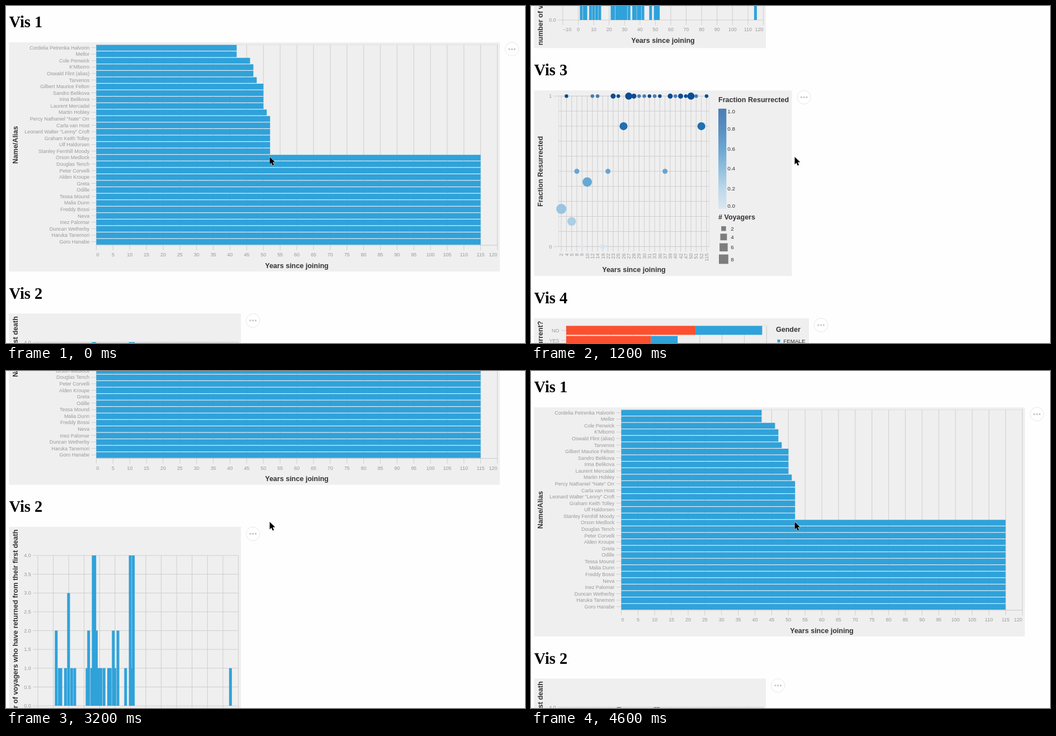
Animation of 928 by 603 pixels, one loop 4800 ms. Source, as an HTML page:

```html
<!DOCTYPE html>
<html lang="en">
<head>
<meta charset="utf-8">
<title>Four charts</title>
<style>
html, body { margin: 0; width: 100%; height: 100%; overflow: hidden; background: #fefefe; }
svg { display: block; width: 928px; height: 603px; }
text { font-family: "Liberation Sans", Arial, sans-serif; }
.heading { font: bold 28.4px "Liberation Serif", Times, serif; }
</style>
</head>
<body>
<svg viewBox="0 0 928 603">
  <defs>
    <linearGradient id="ramp" x1="0" y1="0" x2="0" y2="1">
      <stop offset="0" stop-color="#4d7db3"/>
      <stop offset=".2" stop-color="#588fc2"/>
      <stop offset=".4" stop-color="#6ba6d0"/>
      <stop offset=".6" stop-color="#91bfde"/>
      <stop offset=".8" stop-color="#bdd7ea"/>
      <stop offset="1" stop-color="#dae6f3"/>
    </linearGradient>
  </defs>
  <g id="page"></g>
  <path d="M471.5 270v13.4l3.1-2.9 2.1 5 2.4-1-2.1-4.9h4.3z" fill="#000" stroke="#fff" stroke-width="1" paint-order="stroke"/>
</svg>
<script>
const BLUE = '#30a2da', RED = '#fc4f30', GRID = '#cbcbcb', FAINT = '#dcdcdc';
const LABEL = 8.96, TITLE = 12.54, LEGEND = 9.86;

const range = (n, f) => Array.from({ length: n }, (_, i) => f(i)).join('');
const rect = (x, y, w, h, fill) => `<rect x="${x}" y="${y}" width="${w}" height="${h}" fill="${fill}"/>`;
const line = (x1, y1, x2, y2, color = GRID) =>
  `<path d="M${x1} ${y1}L${x2} ${y2}" stroke="${color}" stroke-width=".9"/>`;
const frame = (x, y, w, h) =>
  `<rect x="${x}" y="${y}" width="${w}" height="${h}" fill="none" stroke="${FAINT}" stroke-width=".9"/>`;

// Text centred vertically on y
function text(s, x, y, { size = LABEL, anchor = 'middle', fill = '#999', bold = false, turn = false } = {}) {
  const spin = turn ? ` transform="rotate(-90 ${x} ${y})"` : '';
  return `<text x="${x}" y="${y + size * .355}" font-size="${size}" text-anchor="${anchor}" fill="${fill}"` +
    `${bold ? ' font-weight="bold"' : ''}${spin}>${s}</text>`;
}
const title = (s, x, y, opts) => text(s, x, y, { size: TITLE, bold: true, fill: '#333', ...opts });
const legend = (s, x, y) => text(s, x, y, { size: LEGEND, anchor: 'start', fill: '#333' });
const yLabel = (s, x, y) => text(s, x, y, { anchor: 'end' });
const heading = (n, y) => `<text class="heading" x="5.5" y="${y}">Vis ${n}</text>`;
const group = (y, body) => `<g transform="translate(0 ${y})">${body}</g>`;

function menu(x, y) {
  return `<circle cx="${x}" cy="${y}" r="12.2" fill="#fff" stroke="#e4e4e4" stroke-width=".9"/>` +
    range(3, i => `<circle cx="${x - 4.8 + i * 4.8}" cy="${y}" r="1.7" fill="#cacaca"/>`);
}

// Vertical grid with ticks; the end labels stay inside the plot
function xAxis(x, step, count, top, bottom, first, unit) {
  return range(count + 1, i => {
    const px = x + i * step, v = first + i * unit;
    const anchor = i === 0 ? 'start' : i === count ? 'end' : 'middle';
    return line(px, top, px, bottom + 9) + text(v < 0 ? '\u2212' + -v : v, px, bottom + 17, { anchor });
  });
}

const names = [
  'Cordelia Petrenka Halvorin', 'Mellor', 'Cole Penwick', "K'Mborro", 'Oswald Flint (alias)',
  'Tarvenos', 'Gilbert Maurice Felton', 'Sandro Belikova', 'Irina Belikova', 'Laurent Mercadal',
  'Martin Hobley', 'Percy Nathaniel "Nate" Orr', 'Carla van Host', 'Leonard Walter "Lenny" Croft',
  'Graham Keith Tolley', 'Ulf Haldorsen', 'Stanley Fernhill Moody', 'Orson Medlock', 'Douglas Tench',
  'Peter Corvelli', 'Alden Kroupe', 'Greta', 'Odille', 'Tessa Mound', 'Malia Dunn', 'Freddy Bossi',
  'Neva', 'Inez Palomar', 'Duncan Wetherby', 'Haruka Tanemori', 'Goro Hanabe'
];
const service = [42, 42, 46, 47, 47, 48, 50, 50, 50, 50, 51, 52, 52, 52, 52, 52, 52];

function chart1() {
  const x = 161.5, y = 69.2, step = 11.57, bottom = 428, perYear = 5.975;
  return heading(1, 38) + rect(5.5, 65, 877.5, 410, '#efefef') + menu(904.7, 77.2) +
    frame(x, y, 717, bottom - y) +
    xAxis(x, perYear * 5, 24, y, bottom, 0, 5) +
    names.map((name, i) => {
      const cy = 74.5 + i * step;
      return line(152.5, cy, x, cy) + yLabel(name, 149.2, cy) +
        rect(x, cy - 4.9, (service[i] || 115) * perYear, 10.4, BLUE);
    }).join('') +
    line(x, bottom, x + 717, bottom) +
    title('Years since joining', 520, 464.5) +
    title('Name/Alias', 16.5, 248.5, { turn: true });
}

// Year: number of people who returned
const returned = {
  2: 2, 4: 1, 5: 1, 8: 1, 10: 3, 12: 1, 14: 1, 22: 1, 23: 2, 25: 1, 26: 4, 27: 4, 28: 2, 29: 1, 30: 1,
  31: 1, 33: 1, 36: 1, 37: 1, 39: 2, 40: 1, 42: 2, 47: 1, 50: 4, 51: 1, 52: 4, 115: 1
};

function chart2() {
  const x = 57, top = 128.5, bottom = 397.5, perYear = 2.757, unit = 67.25;
  return heading(2, 50.5) + rect(5.5, 77.3, 414.5, 370.5, '#efefef') + menu(441.6, 89.8) +
    xAxis(x, perYear * 10, 13, top, bottom, -10, 10) +
    range(9, i => {
      const y = bottom - i * unit / 2;
      return line(48, y, 415.4, y) + yLabel((i / 2).toFixed(1), 44.8, y);
    }) +
    Object.entries(returned).map(([year, n]) =>
      rect(81.8 + year * perYear, bottom - n * unit, 5, n * unit, BLUE)).join('') +
    title('Years since joining', 236, 434) +
    title('number of voyagers who have returned from their first death', 16.5, 262.5, { turn: true });
}

const years = [2, 4, 5, 8, 9, 10, 12, 14, 19, 22, 23, 25, 26, 27, 28, 29, 30, 31, 33, 36, 37, 39, 40, 42, 47, 50, 51, 52, 115];
const people = { 2: 8, 5: 6, 8: 2, 10: 7, 19: 2, 22: 2, 23: 2, 26: 5, 27: 4, 28: 2, 37: 2, 39: 2, 42: 2, 50: 4, 52: 5 };
const partial = {
  2: [.25, '#99c4e2'], 5: [1 / 6, '#abcfe6'], 8: [.5, '#68a3d1'], 9: [0, '#dae7f4'], 10: [3 / 7, '#66a8d4'],
  19: [0, '#d5e4f3'], 22: [.5, '#68a3d1'], 26: [.8, '#216eb3'], 37: [.5, '#68a3d1'], 52: [.8, '#216eb3']
};
const pale = [12, 14, 29, 30, 33, 40, 51];

function chart3() {
  const x = 49.5, top = 161.2, bottom = 430.4, h = bottom - top, step = 269 / 29;
  const cx = i => x + (i + .5) * step;
  return heading(3, 124.3) + rect(5.5, 151, 461, 332, '#efefef') + menu(488.2, 163.3) +
    frame(x, top, 269, h) +
    range(11, i => line(i % 10 ? x : 40.5, top + h * i / 10, 318.5, top + h * i / 10)) +
    yLabel('1', 37.2, top) + yLabel('0', 37.2, bottom) +
    years.map((year, i) => line(cx(i), top, cx(i), bottom + 9) +
      text(year, cx(i), 442.5, { anchor: 'end', turn: true })).join('') +
    years.map((year, i) => {
      const [v, color] = partial[year] || [1, pale.includes(year) ? '#4a7bb3' : '#0b4c94'];
      return `<circle cx="${cx(i)}" cy="${bottom - v * h}" r="${3.18 * Math.sqrt(people[year] || 1)}" fill="${color}"/>`;
    }).join('') +
    title('Years since joining', 184, 471.5) +
    title('Fraction Resurrected', 16.5, 296, { turn: true }) +
    title('Fraction Resurrected', 335, 168, { anchor: 'start' }) +
    rect(335, 183.7, 14.3, 179, 'url(#ramp)') +
    [188.5, 219.3, 255, 290.8, 326.6, 357.7].map((y, i) => legend((1 - i / 5).toFixed(1), 351.2, y)).join('') +
    title('# Voyagers', 335, 378, { anchor: 'start' }) +
    [398.3, 413.3, 431.8, 453].map((y, i) => {
      const side = 8.4 * Math.sqrt(i + 1);
      return rect(344.4 - side / 2, y - side / 2, side, side, '#7d7d7d') + legend(2 * i + 2, 357.2, y);
    }).join('');
}

function chart4() {
  const x = 63, top = 572, bottom = 608, unit = 3.981;
  const row = (name, y, a, b) => line(54, y, x, y) + yLabel(name, 50.5, y) +
    rect(x, y - 8, a * unit, 16, RED) + rect(x + a * unit, y - 8, b * unit, 16, BLUE);
  return heading(4, 532) + rect(5.5, 558.5, 491.5, 96.5, '#efefef') + menu(518.5, 571) +
    frame(x, top, 358.3, bottom - top) +
    xAxis(x, unit * 10, 9, top, bottom, 0, 10) +
    row('NO', 580.4, 58, 30) + row('YES', 598.4, 38, 12) +
    line(x, bottom, x + 358.3, bottom) +
    title('Count of Records', 242, 645) +
    title('Current?', 16.5, 590, { turn: true }) +
    title('Gender', 438, 578.5, { anchor: 'start' }) +
    rect(440.5, 596.8, 5, 5, BLUE) + legend('FEMALE', 451.2, 599.5) +
    rect(440.5, 609.8, 5, 5, RED) + legend('MALE', 451.2, 612.5);
}

const page = document.getElementById('page');
page.innerHTML = group(0, chart1()) + group(473, chart2()) + group(845.5, chart3() + chart4());

// Scroll position for each 200 ms step, with elastic overscroll at the top
const scroll = [
  0, 1, 42, 225, 473, 692, 845.5, 880, 893, 900, 904, 905,
  905, 733.5, 560, 405, 271.5, -25, -5.5, -1, 0, 0, 0, 0
];
function draw() {
  const step = Math.floor(performance.now() % 4800 / 200);
  page.setAttribute('transform', `translate(0 ${-scroll[step]})`);
  requestAnimationFrame(draw);
}
draw();
</script>
</body>
</html>
```
